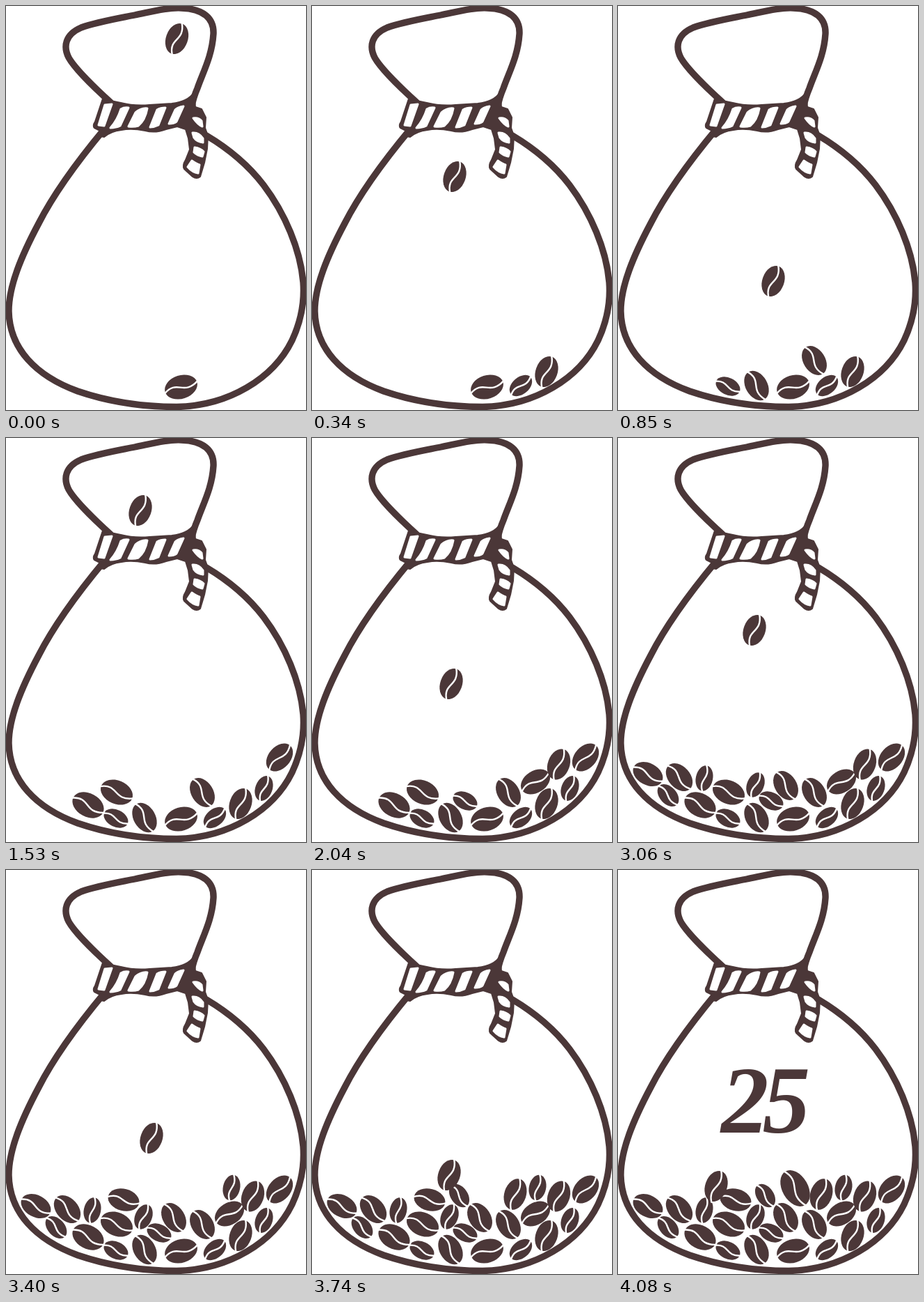
Animation, 431 px wide and 580 px high, one loop 4.25 s. Source, as an HTML page with a canvas:

```html
<!DOCTYPE html>
<html lang="en">
<head>
<meta charset="utf-8">
<title>Bag of beans</title>
<style>
html, body { margin: 0; width: 100%; height: 100%; overflow: hidden; background: #fff; }
canvas { display: block; }
</style>
</head>
<body>
<canvas id="stage" width="431" height="580"></canvas>
<script>
const ctx = document.getElementById('stage').getContext('2d');
const INK = '#4b3738';
const STEP = 170;
const STEPS = 25;

const outlines = [
  'M141 177C111 213 71 265 47 312C22 359 4 402 4 438C5 492 43 531 103 553C150 569 198 575.5 245 575.5C320 574 384 535 411 480C424 452 429 424 427 397C423 350 401 298 370 257C347 227 320 205 288 186',
  'M150 138C130 120 99 90 90 74C82 58 85 41 108 31C130 23 160 18 185 13C210 8 232 2 252 3C284 4 299 18 298 40C296 72 283 95 275 118Q269 132 267 144'
].map(d => new Path2D(d));

const rope = new Path2D('M139 133Q150 136 165 139Q185 144 206 142L238 140Q262 137 270 124L272 145L281 148L287 160L286 175L290 186L289 205L285 225L279 245Q274 249 268 245L256 234Q253 229 258 221L264 206L262 190L258 177L246 173L230 177Q214 183 200 179Q180 175 166 178Q150 180 141 188L130 186L135 179L127 175Q124 172 128 166Z');

const gaps = new Path2D(
  'M142 142L152 141L141 172L133 171Z' +
  'M165 148Q170 145 176 146L164 172Q158 175 150 175Q160 164 165 148Z' +
  'M186 153Q194 146 203 147Q200 164 190 172Q184 174 176 173Z' +
  'M217 149Q222 146 229 146L219 171Q213 174 207 174Z' +
  'M243 149Q247 145 255 144L245 166Q241 169 234 169Z' +
  'M269 161Q277 160 281 165L282 173Q276 171 269 161Z' +
  'M268 182Q277 181 283 190L283 196Q274 195 270 189Z' +
  'M271 203Q279 204 284 209L282 216Q275 215 270 210Z' +
  'M267 222Q274 227 278 228L276 240Q268 239 261 231Z');

// Half length and half width of each bean size
const sizes = { s: [18.5, 12.2], m: [22.8, 15.7], l: [24, 16.8], x: [28, 18.5] };

// Resting beans in order of arrival: x, y, size, tilt in degrees
const pile = [
  [251.5, 547, 'l', -18], [300, 545, 's', -40], [337, 525, 'm', -70],
  [199, 545, 'm', 60], [282, 509, 'm', 58], [158, 546, 's', 26],
  [118, 527, 'l', 28], [370.5, 503, 's', -70], [393, 458.5, 'm', -48],
  [159, 508.5, 'l', 23], [220, 521, 's', 26], [321, 493.5, 'm', -32],
  [354.5, 468.5, 'm', -70], [241, 499, 'm', 58], [72, 513, 's', 48],
  [197.5, 498, 's', -68], [43, 482.5, 'm', 28], [124, 488.5, 's', -78],
  [88, 487, 'm', 48], [169, 473.5, 'm', 14], [324, 456, 's', -78],
  [211.5, 467.5, 's', 55], [292, 465.5, 'm', -72], [254.5, 457, 'x', 60],
  [141, 454, 'm', -70]
];

// One drop per eight steps; the eighth step is empty
const drops = [
  [[245.5, 47], [216, 105], [205, 245], [219, 292], [216, 354], [223, 395], [198, 470]],
  [[223, 46], [193, 104], [186, 244], [201, 291], [200, 353], [213, 393], [184, 468]],
  [[233, 79], [203, 136], [196, 276], [211, 323], [209, 385], [218, 426], [197, 438]]
];

function bean(x, y, size, tilt) {
  const [a, b] = sizes[size];
  ctx.save();
  ctx.translate(x, y);
  ctx.rotate(tilt * Math.PI / 180);
  ctx.fillStyle = INK;
  ctx.beginPath();
  ctx.ellipse(0, 0, a, b, 0, 0, Math.PI * 2);
  ctx.fill();
  ctx.strokeStyle = '#fff';
  ctx.lineWidth = 2.4;
  ctx.beginPath();
  ctx.moveTo(-a - 1, 1.5);
  ctx.bezierCurveTo(-0.1 * a, -0.75 * b, 0, 0.8 * b, a + 1, -1);
  ctx.stroke();
  ctx.restore();
}

function bag() {
  ctx.lineJoin = ctx.lineCap = 'round';
  ctx.strokeStyle = ctx.fillStyle = INK;
  ctx.lineWidth = 9.4;
  outlines.forEach(path => ctx.stroke(path));
  ctx.lineWidth = 2;
  ctx.fill(rope);
  ctx.stroke(rope);
  ctx.fillStyle = ctx.strokeStyle = '#fff';
  ctx.lineWidth = 3;
  ctx.fill(gaps);
  ctx.stroke(gaps);
}

function total() {
  ctx.fillStyle = INK;
  ctx.font = 'italic bold 137px "Liberation Serif", serif';
  ctx.letterSpacing = '-9px';
  ctx.fillText(String(pile.length), 148, 377);
}

function draw(now) {
  const step = Math.floor(now / STEP) % STEPS;
  ctx.fillStyle = '#fff';
  ctx.fillRect(0, 0, 431, 580);
  bag();
  const resting = step < 23 ? step + 1 : pile.length;
  pile.slice(0, resting).forEach(item => bean(...item));
  const spot = drops[Math.floor(step / 8)]?.[step % 8];
  if (spot) bean(...spot, 'm', -70);
  if (step === STEPS - 1) total();
}

let start;
function tick(now) {
  start ??= now;
  draw(now - start);
  requestAnimationFrame(tick);
}
draw(0);
requestAnimationFrame(tick);
</script>
</body>
</html>
```
